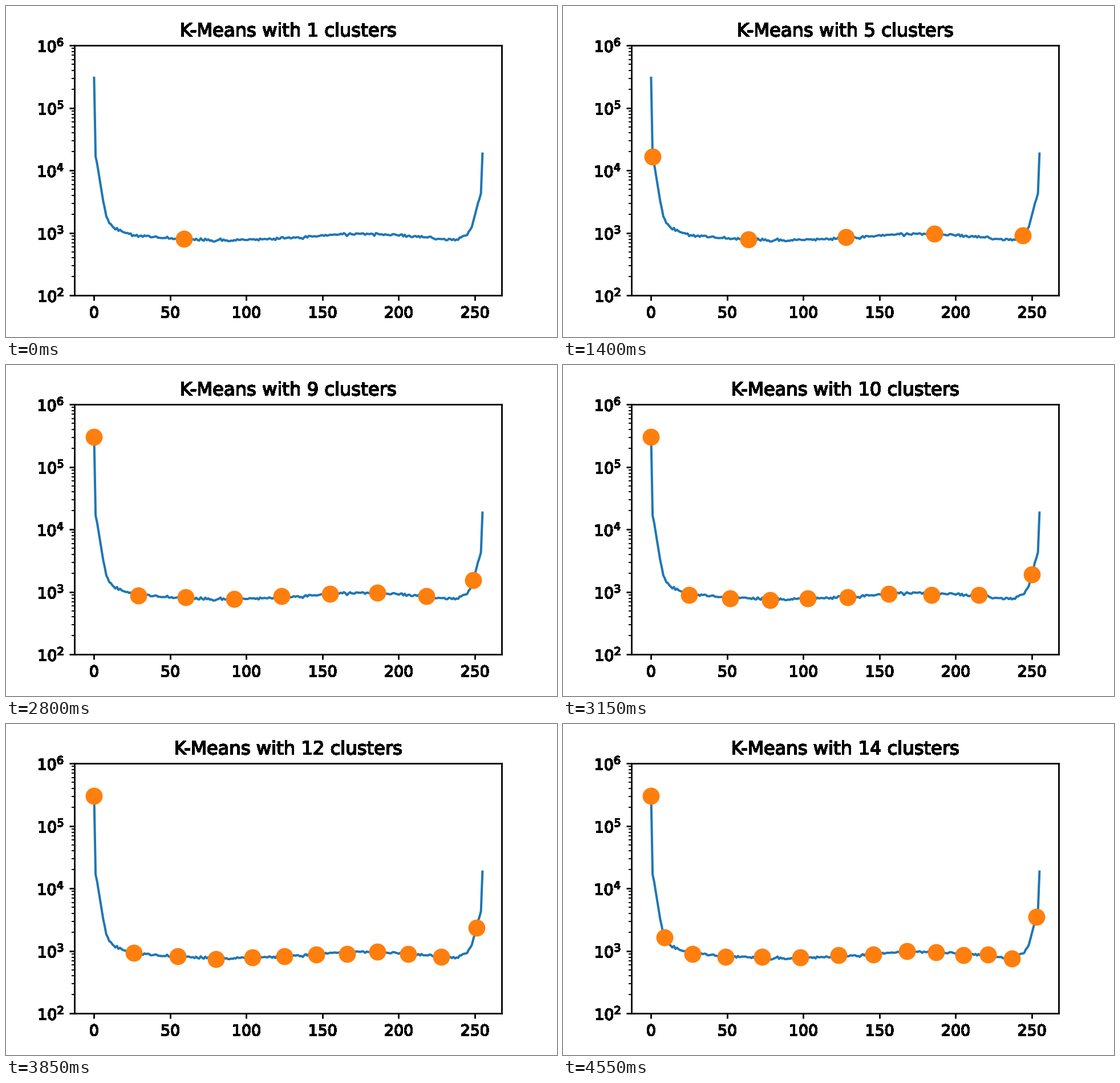
A matplotlib script that plays this animation: 966 by 580 pixels, repeating every 4.9 s.

```python
import matplotlib.pyplot as plt
import matplotlib.patheffects as pe
import numpy as np
from matplotlib.animation import FuncAnimation

DPI = 128
W, H = 966, 580
LEFT, TOP, RIGHT, BOTTOM = 120.4, 69.4, 869.4, 507.4
FRAMES = 14

# log10 of the histogram at its bends
CURVE = [(0, 5.485), (1, 4.224), (2, 4.106), (6, 3.512), (8, 3.28), (10, 3.156),
         (13, 3.08), (25, 2.97), (50, 2.915), (78, 2.885), (100, 2.89),
         (128, 2.915), (160, 2.98), (185, 2.985), (205, 2.96), (225, 2.91),
         (237, 2.89), (245, 2.97), (248, 3.1), (250, 3.279), (252, 3.465),
         (254, 3.63), (255, 4.273)]

# Evenly spaced key points of the centers after the first, for k = 2, 3, ...
KEYS = [(192,), (120, 225), (79, 236), (64, 128, 186, 244), (50, 247),
        (36, 104.5, 173, 247), (29, 248), (29, 249), (25, 95, 165, 250),
        (23, 252), (26, 111, 179, 251), (16, 253), (9, 73, 146, 205, 253)]


def px(n):
    """Pixels to points."""
    return n * 72 / DPI


def histogram():
    levels = np.arange(256)
    logs = np.interp(levels, *zip(*CURVE))
    noise = np.random.default_rng(4).normal(0, 0.3, 256)
    return levels, 10 ** (logs + noise / np.sqrt(10 ** logs))


def centers(k):
    """First center decays towards 0; a smooth curve spreads the others."""
    first = [59 / k ** 2.55]
    if k > 1:
        keys = KEYS[k - 2]
        curve = np.polyfit(np.linspace(0, 1, len(keys)), keys, len(keys) - 1)
        first.extend(np.polyval(curve, np.linspace(0, 1, k - 1)))
    return np.rint(first).astype(int)


levels, counts = histogram()

fig = plt.figure(figsize=(W / DPI, H / DPI), dpi=DPI, facecolor="white")
ax = fig.add_axes([LEFT / W, 1 - BOTTOM / H, (RIGHT - LEFT) / W, (BOTTOM - TOP) / H])
ax.plot(levels, counts, color="#1f77b4", lw=px(4.02))
dots, = ax.plot([], [], "o", color="#ff7f0e", ms=px(27.2), mew=px(2.7))

ax.set_yscale("log")
ax.set_xlim(-12.75, 267.75)
ax.set_ylim(1e2, 1e6)
ax.set_xticks(range(0, 251, 50))
ax.tick_params(which="major", length=px(9.4), width=px(2.8), pad=px(9.4),
               labelsize=px(26.83))
ax.tick_params(which="minor", length=px(5.4), width=px(1.9))
for spine in ax.spines.values():
    spine.set_linewidth(px(2.8))

title = ax.set_title("", fontsize=px(32.2), pad=px(16.1))
for text in [title, *ax.get_xticklabels(), *ax.get_yticklabels()]:
    text.set_antialiased(False)
    text.set_path_effects([pe.withStroke(linewidth=px(0.7), foreground="black")])


def draw(i):
    xs = centers(i + 1)
    dots.set_data(xs, counts[xs])
    title.set_text(f"K-Means with {len(xs)} clusters")
    return dots, title


anim = FuncAnimation(fig, draw, frames=FRAMES, interval=350,
                     repeat=True, repeat_delay=0)
plt.show()
```
